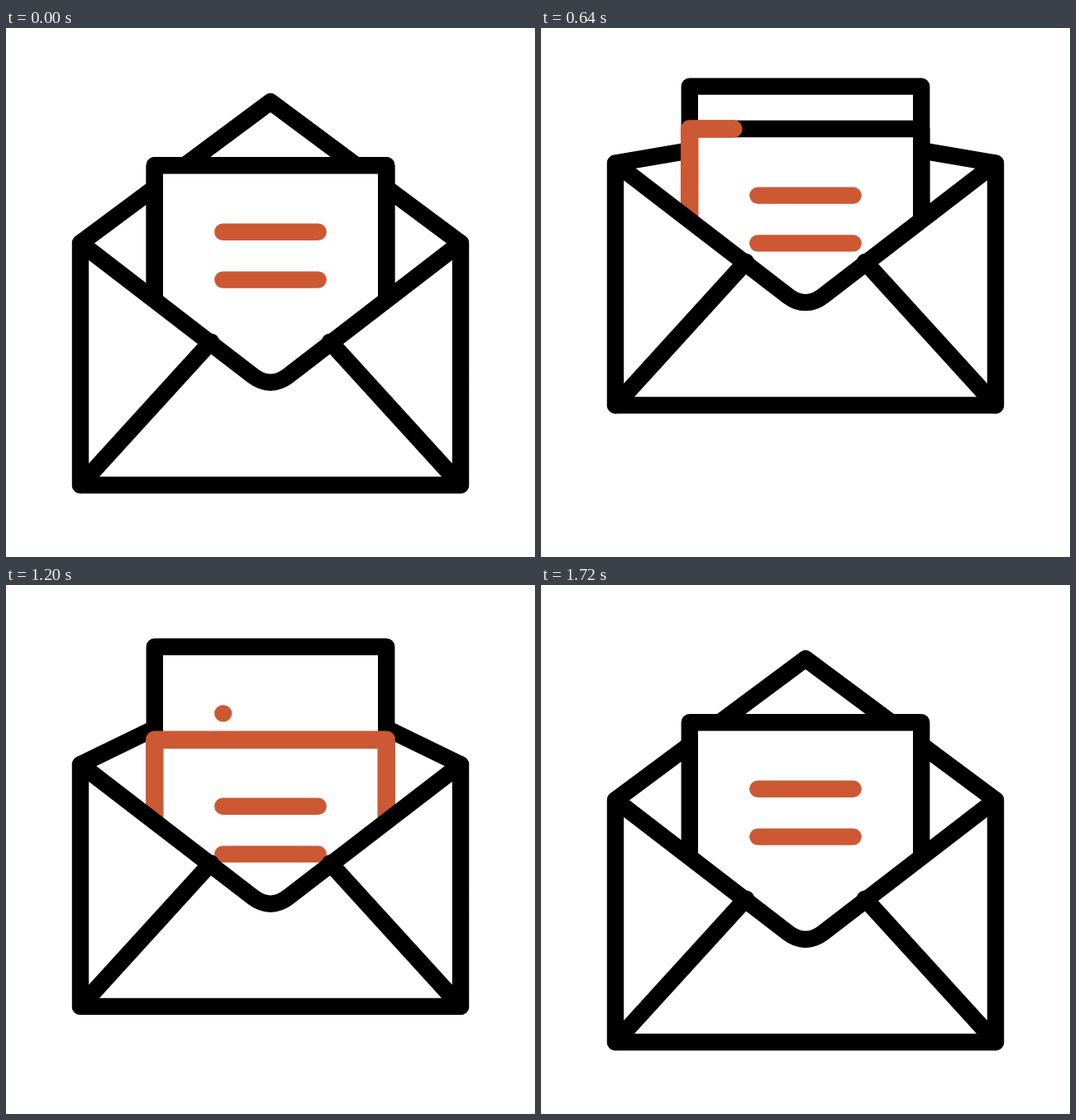
Write an HTML page with a canvas that moves like this. It is 640 px wide and 640 px high and loops after 2 s.

```html
<!DOCTYPE html>
<html lang="en">
<head>
<meta charset="utf-8">
<title>Envelope</title>
<style>
  html, body { margin: 0; width: 100%; height: 100%; overflow: hidden; background: #fff; }
  canvas { display: block; width: 100vw; height: 100vh; }
</style>
</head>
<body>
<canvas id="stage" width="640" height="640"></canvas>
<script>
const ctx = document.getElementById('stage').getContext('2d');
const LOOP = 2000, STEP = 40;
const BLACK = '#000', ORANGE = '#cc5933', WIDTH = 20.4;
const LEFT = 90, RIGHT = 550, CORNER = 260.2, BOTTOM = 553;
const SHEET_LEFT = 179.8, SHEET_RIGHT = 460.2, SHEET_TOP = 166.2;
const TEXT_LEFT = 262.3, TEXT_RIGHT = 377.7, TEXT_ROWS = [246.8, 304.6];

// cubic-bezier(.6, 0, .2, 1)
function ease(x) {
  if (x <= 0) return 0;
  if (x >= 1) return 1;
  let lo = 0, hi = 1;
  for (let i = 0; i < 30; i++) {
    const s = (lo + hi) / 2, r = 1 - s;
    if (1.8 * s * r * r + 0.6 * s * s * r + s * s * s < x) lo = s; else hi = s;
  }
  return lo * lo * (3 - 2 * lo);
}

const tween = (t, start, end) => ease((t - start) / (end - start));

function stroke(points, color = BLACK, width = WIDTH) {
  ctx.beginPath();
  points.forEach(([x, y]) => ctx.lineTo(x, y));
  ctx.strokeStyle = color;
  ctx.lineWidth = width;
  ctx.stroke();
}

function drawSheet(lift, rows) {
  const top = SHEET_TOP - lift;
  ctx.fillStyle = '#fff';
  ctx.fillRect(SHEET_LEFT, top, SHEET_RIGHT - SHEET_LEFT, 640);
  stroke([[SHEET_LEFT, 640], [SHEET_LEFT, top], [SHEET_RIGHT, top], [SHEET_RIGHT, 640]]);
  rows.forEach((amount, i) => {
    if (amount <= 0) return;
    const y = TEXT_ROWS[i] - lift;
    stroke([[TEXT_LEFT, y], [TEXT_LEFT + (TEXT_RIGHT - TEXT_LEFT) * amount, y]], ORANGE);
  });
}

function drawHighlight(lift, amount) {
  if (amount <= 0) return;
  const top = SHEET_TOP - lift, side = 181;
  const length = 2 * side + SHEET_RIGHT - SHEET_LEFT;
  ctx.setLineDash([length * amount, length * 2]);
  stroke([[SHEET_LEFT, top + side], [SHEET_LEFT, top],
          [SHEET_RIGHT, top], [SHEET_RIGHT, top + side]], ORANGE, 21.5);
  ctx.setLineDash([]);
}

function drawFront() {
  const pocket = new Path2D();
  pocket.moveTo(LEFT, CORNER);
  pocket.lineTo(299, 421);
  pocket.bezierCurveTo(312.6, 431.4, 327.4, 431.4, 341, 421);
  pocket.lineTo(RIGHT, CORNER);
  pocket.lineTo(RIGHT, BOTTOM);
  pocket.lineTo(LEFT, BOTTOM);
  pocket.closePath();
  ctx.fillStyle = '#fff';
  ctx.fill(pocket);
  ctx.strokeStyle = BLACK;
  ctx.lineWidth = WIDTH;
  ctx.stroke(pocket);
  stroke([[LEFT, BOTTOM], [248, 379.6]]);
  stroke([[RIGHT, BOTTOM], [392, 379.6]]);
}

function draw(t) {
  const down = tween(t, 840, 1640);
  const bodyLift = 102.4 * (tween(t, 120, 840) - down);
  const flapHeight = 171 - 141 * (tween(t, 160, 840) - down);
  const backLift = 104.9 * (tween(t, 160, 880) - tween(t, 1000, 1720));
  const frontLift = 48.5 * tween(t, 160, 880) - 353 * tween(t, 880, 1880);

  ctx.fillStyle = '#fff';
  ctx.fillRect(0, 0, 640, 640);
  ctx.lineCap = ctx.lineJoin = 'round';

  const corner = CORNER - bodyLift;
  stroke([[LEFT, corner], [320, corner - flapHeight], [RIGHT, corner]]);

  ctx.save();
  ctx.beginPath();
  ctx.rect(0, 0, 640, 540 - bodyLift);
  ctx.clip();
  drawSheet(backLift, [tween(t, 1160, 1640), tween(t, 1240, 1720)]);
  drawSheet(frontLift, [1, 1]);
  drawHighlight(frontLift, tween(t, 440, 960));
  ctx.restore();

  ctx.save();
  ctx.translate(0, -bodyLift);
  drawFront();
  ctx.restore();
}

function tick() {
  const t = performance.now() % LOOP;
  draw(Math.floor(t / STEP) * STEP);
  requestAnimationFrame(tick);
}
tick();
</script>
</body>
</html>
```
